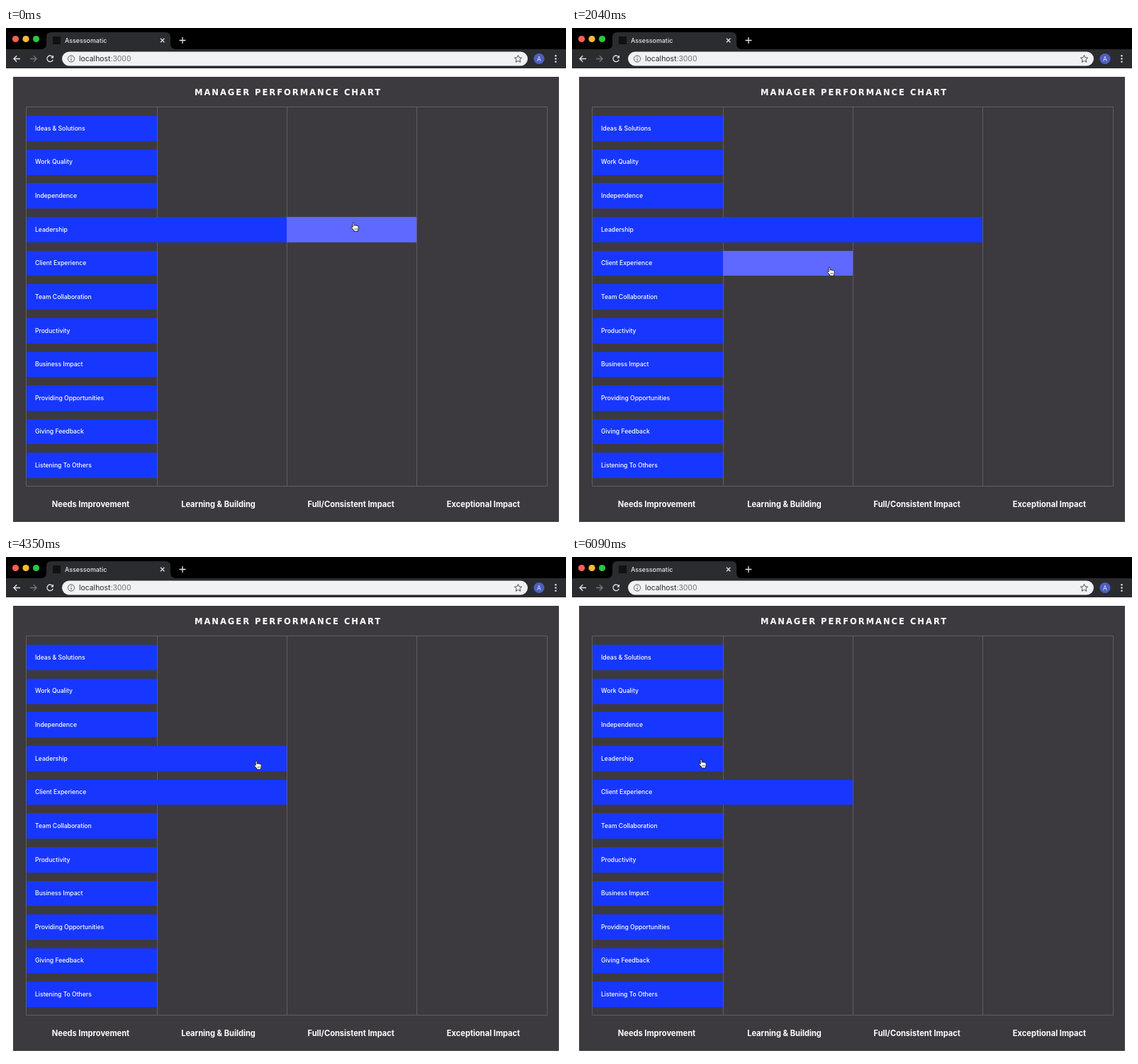
Animation, 790 px wide and 708 px high, one loop 6.12 s. Source, as an HTML page:

```html
<!DOCTYPE html>
<html lang="en">
<head>
<meta charset="utf-8">
<title>Manager Performance Chart</title>
<style>
  :root { --blue: #1737ff; --light: #5f68ff; --gray: #626064; --clear: transparent; }
  html, body { margin: 0; width: 100%; height: 100%; overflow: hidden; background: #fff; }
  svg { display: block; width: 790px; height: 708px; font-family: Inter, sans-serif; }
  .title { font: 700 11.5px "DejaVu Sans", sans-serif; letter-spacing: 2px; fill: #fff; }
  .label { font-size: 8.6px; font-weight: 500; fill: #fff; }
  .head { font-size: 11.1px; font-weight: 700; fill: #fff; text-anchor: middle; }
  .icon { fill: none; stroke: #e4e5e7; stroke-width: 1.3; }
  .grid { fill: none; stroke: #5e5d61; }

  .cell, #hand { animation: 6120ms ease infinite; }
  #lead1 { animation-name: lead1; }
  #lead2 { animation-name: lead2; }
  #lead3 { animation-name: lead3; }
  #client2 { animation-name: client2; }
  #client3 { animation-name: client3; }
  #hand { animation-name: hand; }

  @keyframes lead1 {
    0%, 75.33% { fill: var(--blue); }
    80.23%, 85.78% { fill: var(--light); }
    90.69%, 100% { fill: var(--blue); }
  }
  @keyframes lead2 {
    0%, 45.92% { fill: var(--blue); }
    50.82%, 63.73% { fill: var(--light); }
    68.63%, 75.33% { fill: var(--blue); }
    80.23%, 85.78% { fill: var(--gray); }
    90.69%, 100% { fill: var(--clear); }
  }
  @keyframes lead3 {
    0%, 6.86% { fill: var(--light); }
    11.76%, 45.92% { fill: var(--blue); }
    50.82%, 63.73% { fill: var(--gray); }
    68.63%, 100% { fill: var(--clear); }
  }
  @keyframes client2 {
    0%, 16.75% { fill: var(--clear); }
    21.65%, 26.14% { fill: var(--blue); }
    31.05%, 37.58% { fill: var(--light); }
    42.48%, 100% { fill: var(--blue); }
  }
  @keyframes client3 {
    0%, 16.75% { fill: var(--clear); }
    21.65%, 26.14% { fill: var(--light); }
    31.05%, 100% { fill: var(--clear); }
  }
  @keyframes hand {
    0%, 13.89% { transform: translate(492px, 281px); }
    18.79%, 23.53% { transform: translate(494px, 325px); }
    28.76%, 43.46% { transform: translate(365px, 344px); }
    48.37% { transform: translate(355px, 294px); }
    73.04% { transform: translate(355px, 294px); animation-timing-function: ease-out; }
    76.47% { transform: translate(194px, 291px); animation-timing-function: ease-out; }
    78.1%, 100% { transform: translate(184px, 292px); }
  }
</style>
</head>
<body>
<svg viewBox="0 0 790 708">
  <!-- browser bar -->
  <rect width="790" height="57" fill="#000"/>
  <path d="M49 30q8 0 8-8V13q0-7 7-7h161q7 0 7 7v9q0 8 8 8h550v27H0V30z" fill="#2b2c2f"/>
  <circle cx="13.5" cy="15.5" r="4.6" fill="#ff5f57"/>
  <circle cx="28" cy="15.5" r="4.6" fill="#febc2e"/>
  <circle cx="42.5" cy="15.5" r="4.6" fill="#28c840"/>
  <rect x="66" y="12" width="11" height="11" fill="#111"/>
  <text x="83" y="20.5" font-size="8.9" font-weight="500" fill="#e8e9eb">Assessomatic</text>
  <path class="icon" d="M218 14.8l5.4 5.4m0-5.4l-5.4 5.4"/>
  <path class="icon" stroke-width="1.6" d="M244.5 17.5h9m-4.5-4.5v9"/>
  <path class="icon" d="M20 43.5h-9m4.2-4.3l-4.3 4.3 4.3 4.3"/>
  <path class="icon" style="stroke:#77787b" d="M34 43.5h9m-4.2-4.3l4.3 4.3-4.3 4.3"/>
  <path class="icon" d="M66 41.2a4.3 4.3 0 1 0 .3 3.6"/>
  <path d="M67 38.5v4h-4z" fill="#e4e5e7"/>
  <rect x="79" y="33.5" width="657" height="20" rx="10" fill="#f1f2f3"/>
  <circle class="icon" style="stroke:#5c5e62;stroke-width:1" cx="92" cy="43.5" r="4.6"/>
  <path d="M92 43v3.2m0-5.6v1.2" stroke="#5c5e62" stroke-width="1.1"/>
  <text x="103" y="47" font-size="10.4" fill="#26272a">localhost<tspan fill="#717377">:3000</tspan></text>
  <path d="M722.5 38.4l1.5 3.4 3.7.3-2.8 2.5.8 3.7-3.2-1.9-3.2 1.9.8-3.7-2.8-2.5 3.7-.3z" fill="none" stroke="#4c4e52"/>
  <circle cx="752" cy="43.5" r="7.6" fill="#4d5fc0"/>
  <text x="752" y="46.6" font-size="8.5" text-anchor="middle" fill="#e6e8f6">A</text>
  <g fill="#e4e5e7">
    <circle cx="775.5" cy="39.3" r="1.2"/><circle cx="775.5" cy="43.5" r="1.2"/><circle cx="775.5" cy="47.7" r="1.2"/>
  </g>

  <!-- chart -->
  <rect x="10" y="69" width="770" height="629" fill="#3c3a3f"/>
  <text class="title" x="266" y="95">MANAGER PERFORMANCE CHART</text>
  <path class="grid" d="M28.5 111.5h735v536h-735zM213.5 112v535M396.5 112v535M579.5 112v535"/>
  <g id="rows"></g>
  <text class="head" x="119.5" y="677">Needs Improvement</text>
  <text class="head" x="299.5" y="677">Learning &amp; Building</text>
  <text class="head" x="486.7" y="677">Full/Consistent Impact</text>
  <text class="head" x="673.5" y="677">Exceptional Impact</text>

  <g id="hand">
    <path d="M-2.9 .8V-4.6q0-1.2 1-1.2t1.1 1.2v3q.2-.7 1-.7t1.1.8q.3-.5 1-.5 .9 0 1.1.9.3-.3.8-.3 1 0 1 1.2V2.4q0 1-.7 2.2V6.2H-1.2V5L-4.6 1.2q-.7-1 .1-1.5.8-.4 1.6 1.1z"
      fill="#fff" stroke="#111" stroke-width=".9" stroke-linejoin="round"/>
    <path d="M-.1 1.8v2.3m1.7-2.3v2.3m1.7-2.3v2.3" stroke="#222" stroke-width=".6"/>
  </g>
</svg>
<script>
  const names = ["Ideas & Solutions", "Work Quality", "Independence", "Leadership", "Client Experience",
    "Team Collaboration", "Productivity", "Business Impact", "Providing Opportunities",
    "Giving Feedback", "Listening To Others"];
  const edges = [29, 213, 396, 579];
  const live = { 3: ["lead1", "lead2", "lead3"], 4: [null, "client2", "client3"] };
  const rows = document.getElementById("rows");

  function add(tag, attrs, text = "") {
    const el = document.createElementNS("http://www.w3.org/2000/svg", tag);
    for (const key in attrs) el.setAttribute(key, attrs[key]);
    el.textContent = text;
    rows.append(el);
  }

  function addCell(col, y, height, id) {
    const box = { x: edges[col], y, width: edges[col + 1] - edges[col], height, fill: "#1737ff" };
    add("rect", id ? { ...box, id, class: "cell" } : box);
  }

  names.forEach((name, i) => {
    const top = 124.2 + i * 47.62;
    const y = Math.round(top);
    const height = Math.round(top + 35.7) - y;
    const ids = live[i] || [null];
    ids.forEach((id, col) => addCell(col, y, height, id));
    add("text", { class: "label", x: 41, y: (top + 20.6).toFixed(1) }, name);
  });
</script>
</body>
</html>
```
